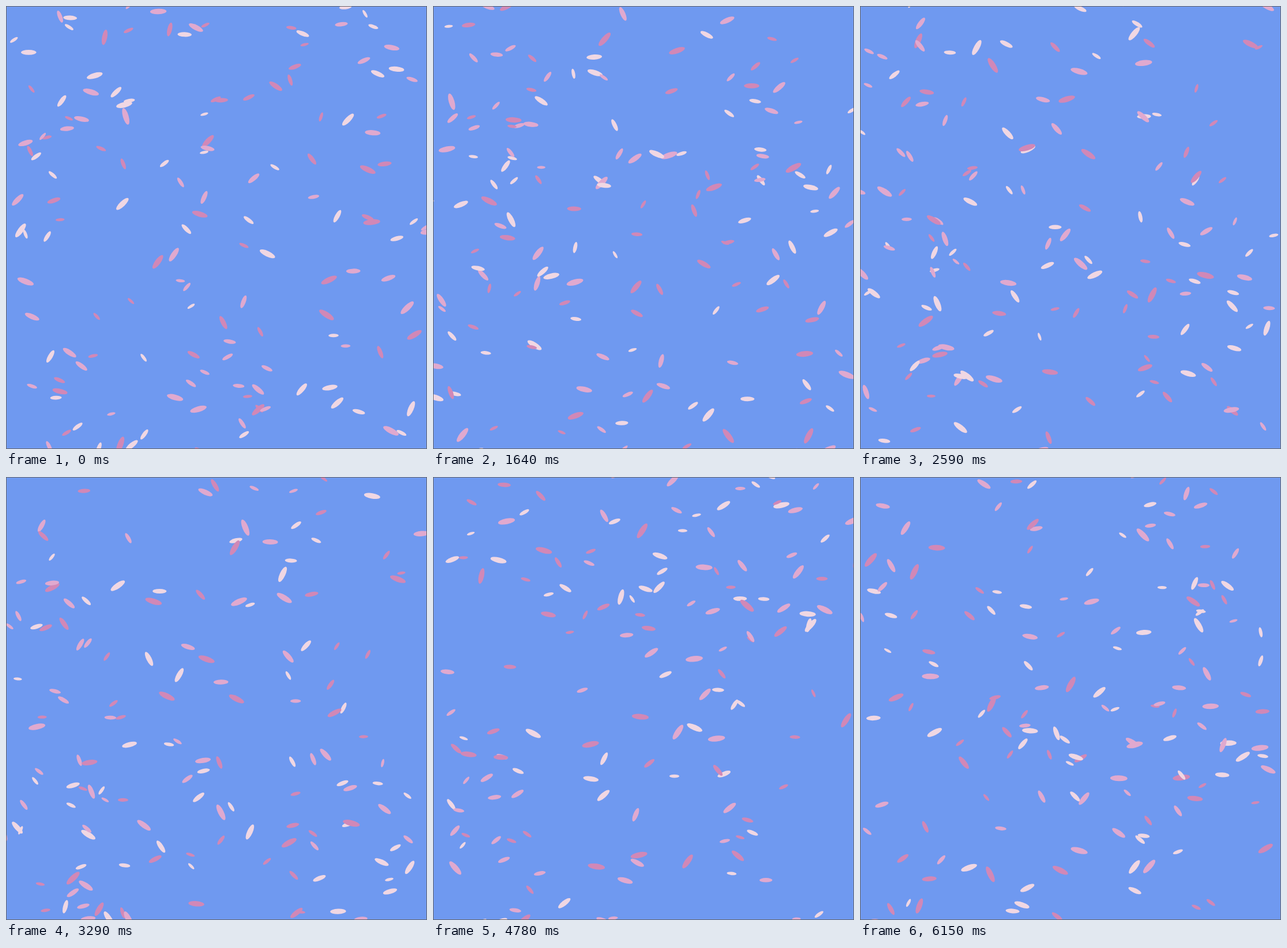
These frames come from a looping animation (730 px wide and 768 px high, 6.25 s). An HTML page with a canvas:

```html
<!DOCTYPE html>
<html lang="en">
<head>
<meta charset="utf-8">
<title>Falling petals</title>
<style>
  html, body { margin: 0; width: 100%; height: 100%; overflow: hidden; background: #6f99f0; }
  canvas { display: block; width: 730px; height: 768px; }
</style>
</head>
<body>
<canvas id="stage" width="730" height="768"></canvas>
<script>
const W = 730, H = 768, MARGIN = 16, SPAN = H + 2 * MARGIN;
const LOOP = 6250, STEPS = 46, COUNT = 156;
const SKY = '#6f99f0', FRAME = '#66666a';
const COLORS = ['#f0d7e3', '#e0a9cf', '#d188b7'];
const ctx = document.getElementById('stage').getContext('2d');

let seed = 7319;
function rand(lo, hi) {
  seed = (seed + 0x6d2b79f5) | 0;
  let n = Math.imul(seed ^ (seed >>> 15), 1 | seed);
  n = (n + Math.imul(n ^ (n >>> 7), 61 | n)) ^ n;
  return lo + (hi - lo) * ((n ^ (n >>> 14)) >>> 0) / 4294967296;
}

function makePetal(_, i) {
  return {
    color: COLORS[i % COLORS.length],
    x: rand(0, W),
    y: rand(0, SPAN),
    size: rand(14, 30),
    speed: rand(130, 230),
    sway: rand(10, 30),
    rate: rand(1.2, 1.8),
    phase: rand(0, 2 * Math.PI),
    tilt: rand(-0.6, 0.6)
  };
}

const petals = Array.from({ length: COUNT }, makePetal);
petals.sort((a, b) => a.speed - b.speed);

// A petal swings sideways as it falls and leans against the swing;
// past the bottom it starts again at the top in another column.
function drawPetal(p, t) {
  const fall = p.y + p.speed * t;
  const lap = Math.floor(fall / SPAN);
  const swing = Math.cos(p.rate * t + p.phase);
  const x = (p.x + lap * 0.618 * W) % W + p.sway * swing;
  const y = fall % SPAN - MARGIN;
  ctx.fillStyle = p.color;
  ctx.beginPath();
  ctx.ellipse(x, y, p.size / 2, p.size / 6, p.tilt - 0.8 * swing, 0, 2 * Math.PI);
  ctx.fill();
}

function draw(t) {
  ctx.fillStyle = SKY;
  ctx.fillRect(0, 0, W, H);
  for (const p of petals) drawPetal(p, t);
  ctx.strokeStyle = FRAME;
  ctx.strokeRect(0.5, 0.5, W - 1, H - 1);
}

const start = performance.now();
function tick() {
  const ms = (performance.now() - start) % LOOP;
  const step = Math.floor(ms / LOOP * STEPS);
  draw(step * LOOP / STEPS / 1000);
  requestAnimationFrame(tick);
}
tick();
</script>
</body>
</html>
```
